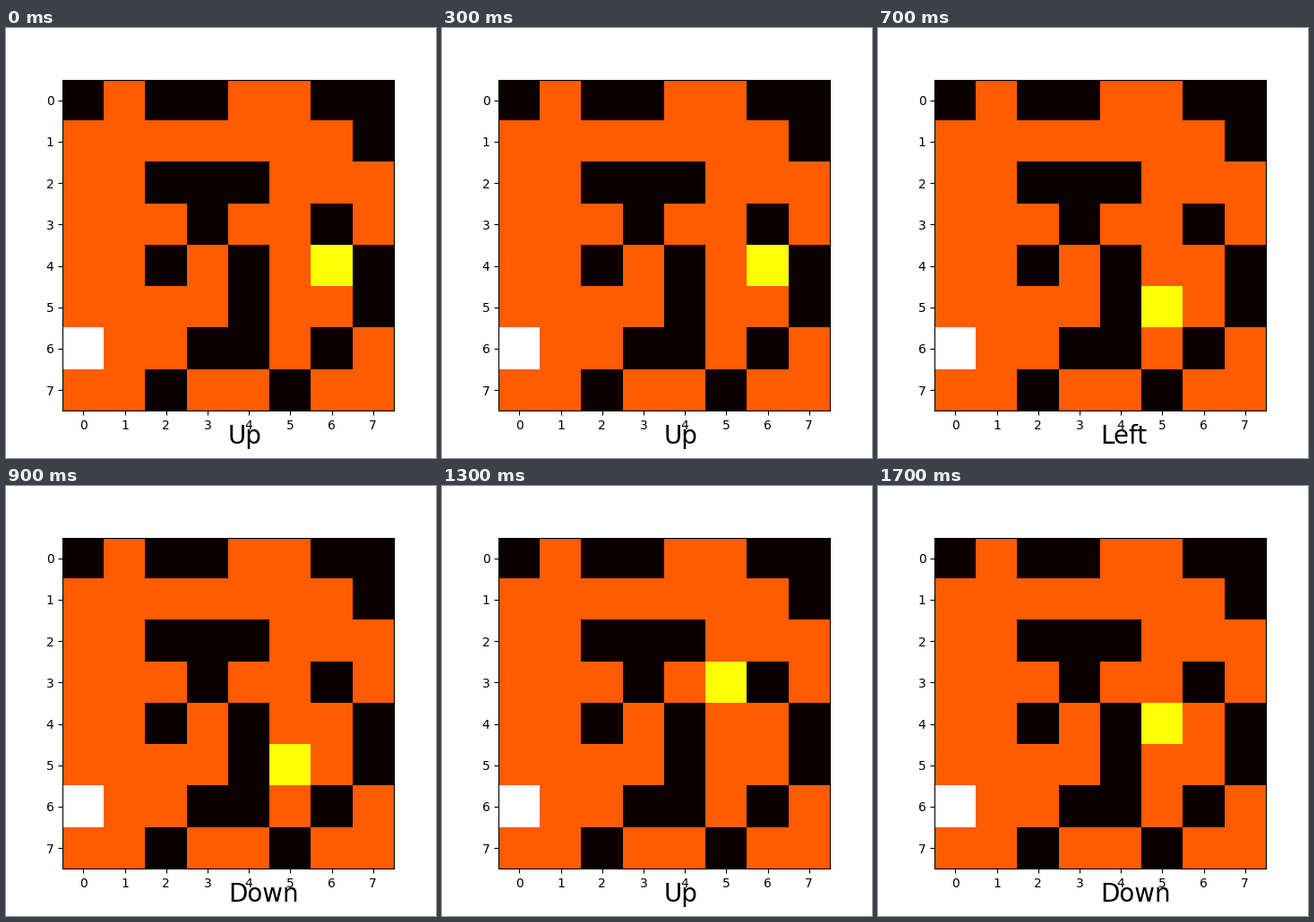
Write a matplotlib script that moves like this. It is 480 px wide and 480 px high and loops after 1900 ms.

```python
import numpy as np
import matplotlib.pyplot as plt
from matplotlib.animation import FuncAnimation

MAZE = [
    "#.##..##",
    ".......#",
    "..###...",
    "...#..#.",
    "..#.#..#",
    "....#..#",
    "G..##.#.",
    "..#..#..",
]
VALUES = {"#": 0.0, ".": 0.5, "G": 1.0}
AGENT = 0.75

# Chosen action and the (row, column) the agent is in afterwards
STEPS = [
    ("Up", (4, 6)),
    ("Down", (5, 6)),
    ("Up", (4, 6)),
    ("Down", (5, 6)),
    ("Left", (5, 5)),
    ("Down", (5, 5)),
    ("Up", (4, 5)),
    ("Up", (3, 5)),
    ("Right", (3, 5)),
    ("Down", (4, 5)),
]
TICK = 100
FRAMES = 19  # the first step lasts one tick, the others two

grid = np.array([[VALUES[c] for c in row] for row in MAZE])

SIZE = 480
SIDE = 0.77
fig = plt.figure(figsize=(SIZE / 100, SIZE / 100), dpi=100, facecolor="white")
ax = fig.add_axes([63.2 / SIZE, 0.11, SIDE, SIDE])
image = ax.imshow(grid, cmap="hot", vmin=0, vmax=1)
ax.set_xticks(range(8))
ax.set_yticks(range(8))
label = ax.text(0.5, -0.1, "", fontsize=20, transform=ax.transAxes)


def update(frame):
    action, cell = STEPS[(frame + 1) // 2]
    board = grid.copy()
    board[cell] = AGENT
    image.set_data(board)
    label.set_text(action)
    return image, label


anim = FuncAnimation(fig, update, frames=FRAMES, interval=TICK,
                     repeat=True, repeat_delay=0)
plt.show()
```
